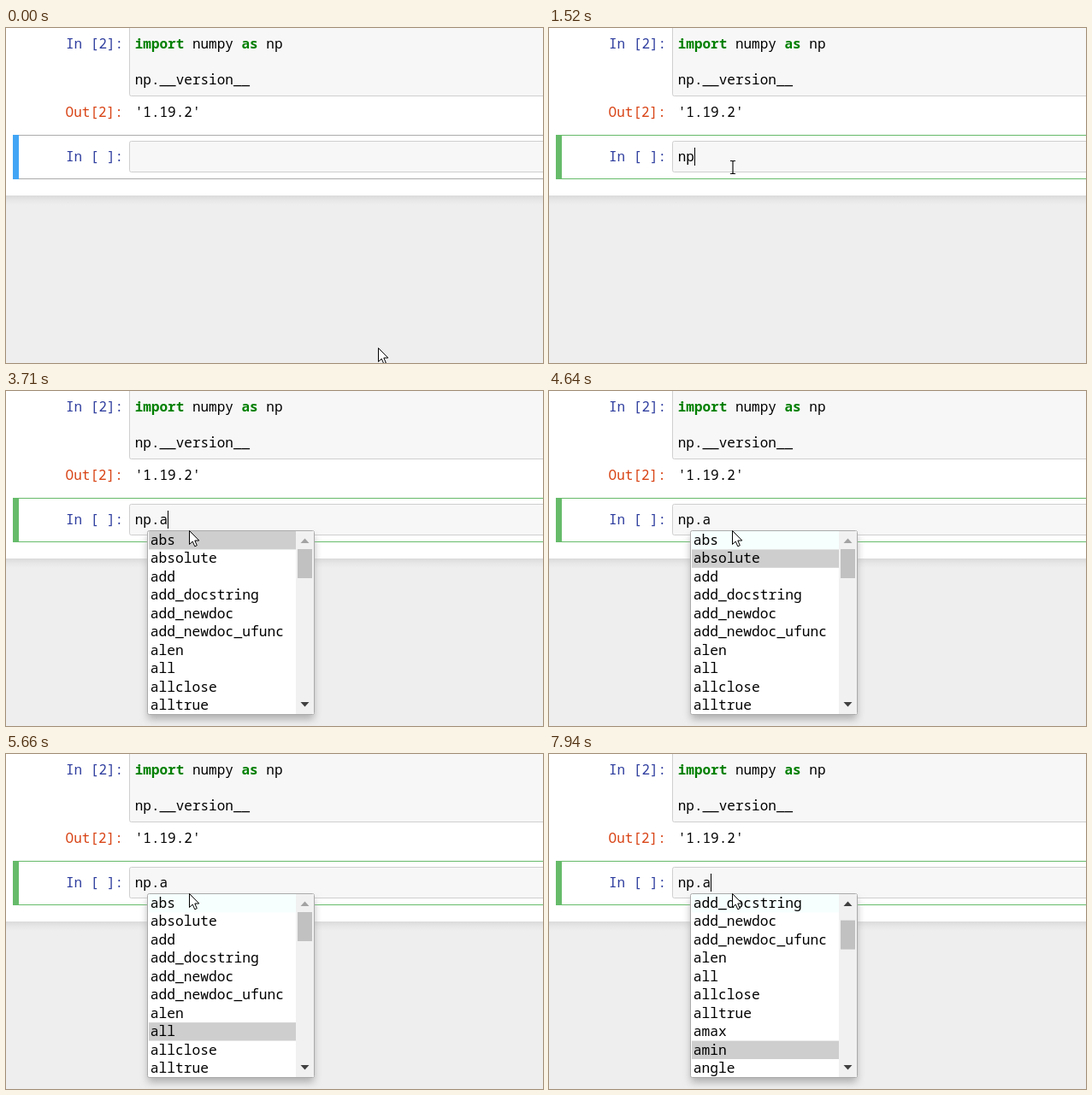
An HTML page for the animation above (8000 ms loop, 628 by 392 pixels).

```html
<!DOCTYPE html>
<html lang="en">
<head>
<meta charset="utf-8">
<title>Notebook completion</title>
<style>
  html, body { margin: 0; width: 100%; height: 100%; overflow: hidden; background: #eee; }
  svg { display: block; width: 628px; height: 392px; }
  text { font: 16px "Noto Sans Mono", "DejaVu Sans Mono", monospace; white-space: pre; fill: #000; }
  .in { fill: #303f9f; }
  .out { fill: #d84315; }
  .kw { fill: #008000; font-weight: bold; }
  .input { fill: #f7f7f7; stroke: #cfcfcf; }
  #rows text { font-size: 16.3px; }
</style>
</head>
<body>
<svg viewBox="0 0 628 392">
  <defs>
    <linearGradient id="edge" x1="0" y1="0" x2="0" y2="1">
      <stop offset="0" stop-color="#dadada"/>
      <stop offset=".5" stop-color="#e7e7e7"/>
      <stop offset="1" stop-color="#eee"/>
    </linearGradient>
    <filter id="blur" x="-20%" y="-20%" width="140%" height="140%">
      <feGaussianBlur stdDeviation="5"/>
    </filter>
  </defs>

  <rect width="628" height="392" fill="#eee"/>
  <rect width="628" height="196" fill="#fff"/>
  <rect y="196" width="628" height="11" fill="url(#edge)"/>

  <rect class="input" x="144.5" y="-9.5" width="500" height="89" rx="2"/>
  <text class="in" x="70" y="24">In [2]:</text>
  <text x="150.7" y="24"><tspan class="kw">import</tspan> numpy <tspan class="kw">as</tspan> np</text>
  <text x="150.7" y="66">np.__version__</text>
  <text class="out" x="69.6" y="104">Out[2]:</text>
  <text x="150.7" y="104">'1.19.2'</text>

  <path id="frame" d="M8 125.5H628M8 176.5H628"/>
  <rect id="bar" x="8" y="125" width="7" height="52"/>
  <rect class="input" x="144.5" y="132.5" width="500" height="36" rx="2"/>
  <text class="in" x="70" y="156">In [ ]:</text>
  <text id="code" x="150.7" y="156"></text>
  <rect id="caret" y="140" width="1" height="21"/>

  <g id="popup">
    <rect x="166" y="170" width="194" height="214" fill="#adadad" filter="url(#blur)"/>
    <rect x="165.5" y="163.5" width="195" height="215" rx="2" fill="#fff" stroke="#ababab"/>
    <rect x="167" y="164" width="172" height="21.4" fill="#f6fffe"/>
    <rect id="pick" x="167" width="172" height="21.4" fill="#cecece"/>
    <g id="rows"></g>
    <rect x="339" y="164" width="21" height="214" fill="#f1f1f1"/>
    <rect id="thumb" x="341" width="17" height="34" fill="#c1c1c1"/>
    <path id="up" d="M344.5 178L349.5 172.5L354.5 178Z"/>
    <path d="M344.5 364L349.5 369.5L354.5 364Z" fill="#404040"/>
  </g>

  <path id="arrow" d="M.5 .5V16.5L4.2 13L6.8 18.8L9.3 17.7L6.8 12H11.8Z" fill="#fff" stroke="#000"/>
  <path id="beam" d="M-3 -7.5H-.7L0 -6.8L.7 -7.5H3M0 -7V7M-3 7.5H-.7L0 6.8L.7 7.5H3" fill="none" stroke="#000" stroke-width="1.1"/>
</svg>
<script>
const LOOP = 8000, ROW = 21.45, TOP = 164, VISIBLE = 10;
const NAMES = ("abs absolute add add_docstring add_newdoc add_newdoc_ufunc " +
  "alen all allclose alltrue amax amin angle").split(" ");
const CLICK = 510, OPEN = 3480;

// [start time, value] pairs; each value holds until the next
const TYPED = [[0, ""], [1300, "n"], [1520, "np"], [1900, "np."], [2680, "np.a"]];
const CARET = [[0, 0], [CLICK, 1], [1040, 0], [1300, 1], [2380, 0], [2680, 1], [3160, 0],
  [3710, 1], [4260, 0], [4790, 1], [5320, 0], [5830, 1], [6380, 0], [6920, 1], [7390, 0], [7940, 1]];
const PICK = [[0, 0], ...[1, 2, 3, 4, 5, 6, 7, 8].map(i => [4470 + i * 170, i]),
  [5980, 9], [6380, 10], [6530, 11], [6610, 12], [6990, 11]];
const SCROLL = [[0, 0], [6380, 1], [6530, 2], [6610, 3]];

const $ = id => document.getElementById(id);
const set = (id, attrs) => {
  for (const key in attrs) $(id).setAttribute(key, attrs[key]);
};
const show = (id, on) => set(id, { visibility: on ? "visible" : "hidden" });
const at = (track, t) => track.filter(([start]) => start <= t).pop()[1];

const rows = Array.from({ length: VISIBLE }, (_, i) => {
  const row = document.createElementNS("http://www.w3.org/2000/svg", "text");
  row.setAttribute("x", 168.7);
  row.setAttribute("y", TOP + 16 + i * ROW);
  return $("rows").appendChild(row);
});

function drawMouse(t) {
  const step = t < 70 ? 0 : Math.min(6, 1 + Math.floor((t - 70) / 74));
  const p = step / 6, ease = p * p * (3 - 2 * p);
  const x = 435 - 221 * ease, y = 374 - 211 * ease;
  const overInput = y < 169 && t < OPEN;
  set("arrow", { transform: `translate(${x} ${y})` });
  set("beam", { transform: `translate(${x + 1} ${y})` });
  show("arrow", !overInput);
  show("beam", overInput);
}

function drawCell(t) {
  const editing = t >= CLICK, typed = at(TYPED, t);
  set("frame", { stroke: editing ? "#66bb6a" : "#ababab" });
  set("bar", { fill: editing ? "#66bb6a" : "#42a5f5" });
  $("code").textContent = typed;
  set("caret", { x: Math.round(151 + typed.length * 9.6) });
  show("caret", at(CARET, t));
}

function drawPopup(t) {
  const first = at(SCROLL, t);
  show("popup", t >= OPEN);
  rows.forEach((row, i) => { row.textContent = NAMES[first + i]; });
  set("pick", { y: TOP + (at(PICK, t) - first) * ROW });
  set("thumb", { y: 185 + first * 3.2 });
  set("up", { fill: first ? "#404040" : "#a3a3a3" });
}

function render(t) {
  drawCell(t);
  drawPopup(t);
  drawMouse(t);
}

const begin = performance.now();
function tick() {
  render((performance.now() - begin) % LOOP);
  requestAnimationFrame(tick);
}
tick();
</script>
</body>
</html>
```
